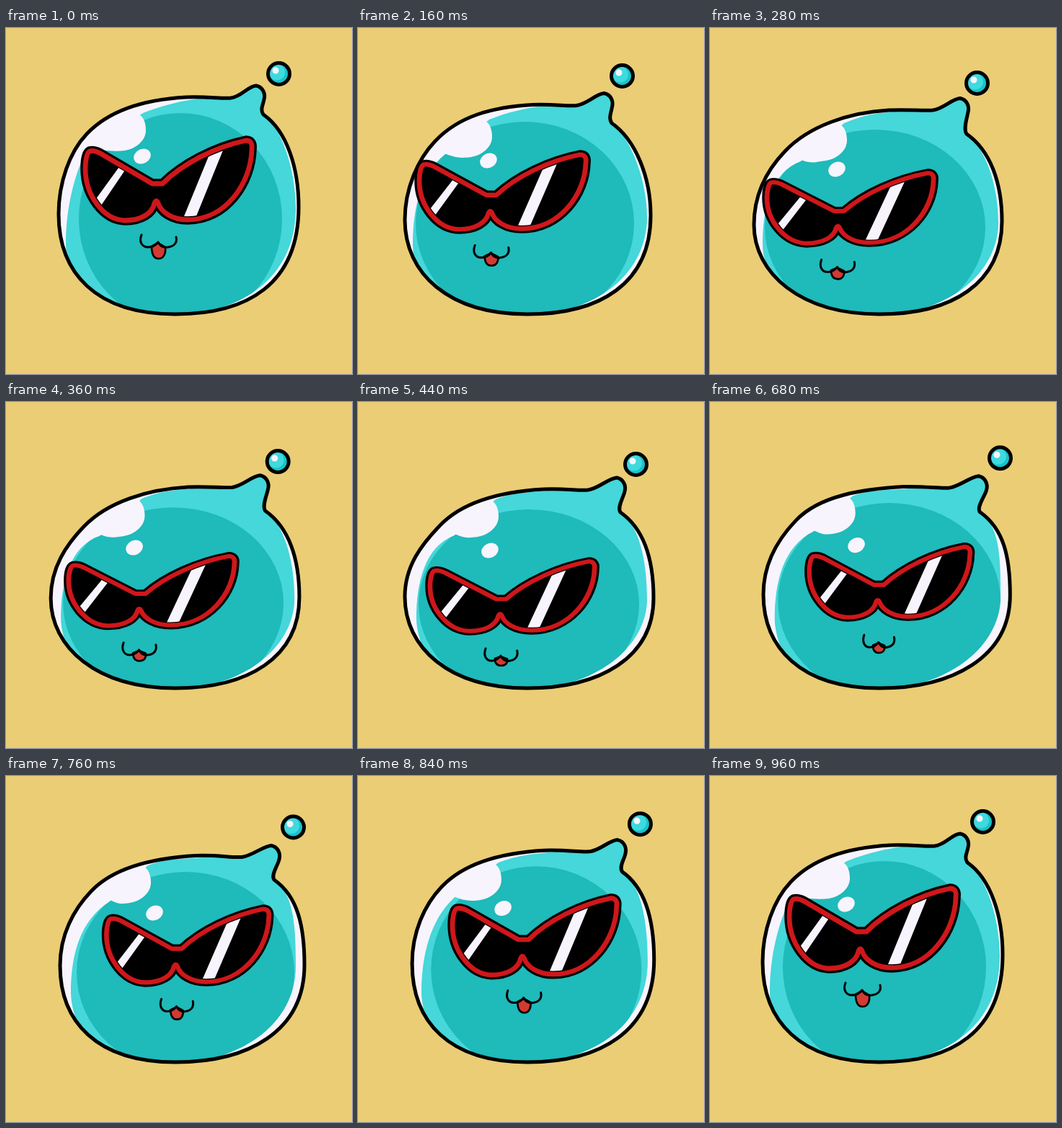
Recreate the animation shown at these times as an HTML page. Size 480 px wide and 480 px high, loop 1000 ms.

```html
<!DOCTYPE html>
<html lang="en">
<head>
<meta charset="utf-8">
<title>Slime in sunglasses</title>
<style>
  html, body { margin: 0; width: 100%; height: 100%; overflow: hidden; background: #eacd75; }
  svg { display: block; width: 100%; height: 100%; }
  .line { fill: none; stroke: #000; stroke-linecap: round; stroke-linejoin: round; }
  .line, #tongue, #glasses path { vector-effect: non-scaling-stroke; }
</style>
</head>
<body>
<!-- In data-d a letter after a point names the track that moves it. -->
<svg viewBox="0 0 480 480">
  <defs>
    <path id="body" data-d="M73,258l C73,215l 88,172a 112,147a C145,112a 195,99t 250,96t
      C280,95t 298,98n 312,97n C327,95n 335,81p 347,80p C357,82p 360,92p 358,99p
      C357,106p 352,113k 357,120k C390,143k 406,195r 406,248r
      C406,355s 335,397 235,397 C125,397 73,340b 73,258l Z"/>
    <path id="light" data-d="M83,300m C83,250m 95,200m 114,166h L190,118g C215,108g 245,100u 275,97u
      L275,80u L345,60p L385,90p L364,126k C385,148k 402,200e 402,250e
      C402,322z 360,378 268,396 L235,420 L130,400 C100,365m 83,330m 83,300m Z"/>
    <path id="frame" d="M116,171 C122,169 127,172 131,174 L203,216 H217 C245,188 290,165 333,156
      C340,156 342,161 341,168 C340,215 305,266 252,266 C230,266 215,255 211,243 Q208.5,237 206,243
      C203,257 188,267 165,267 C135,266 110,232 110,195 C110,185 112,173 116,171 Z"/>
    <clipPath id="inBody"><use href="#body"/></clipPath>
    <clipPath id="inLight"><use href="#light"/></clipPath>
    <clipPath id="inFrame"><use href="#frame"/></clipPath>
  </defs>

  <g clip-path="url(#inBody)">
    <use href="#body" fill="#f8f4fd"/>
    <use href="#light" fill="#45d7d9"/>
    <g clip-path="url(#inLight)"><ellipse id="shade" fill="#1fbaba"/></g>
    <path fill="#f8f4fd" data-d="M112,147a L112,163h C128,170h 150,172g 165,170g
      C182,167g 194,155g 194,142g C194,132g 191,124g 185,120g L180,95g Z"/>
  </g>
  <use href="#body" class="line" stroke-width="5"/>

  <g id="spot"><ellipse rx="12.2" ry="10" fill="#f8f4fd" transform="translate(189 178) rotate(-28)"/></g>

  <g id="drop">
    <circle cx="378.5" cy="63.5" r="15" fill="#17c3ca"/>
    <circle cx="376" cy="61.5" r="11" fill="#3fdade"/>
    <circle cx="374" cy="59" r="4.5" fill="#f8f4fd"/>
    <circle cx="378.5" cy="63.5" r="15" class="line" stroke-width="5"/>
  </g>

  <g id="mouth">
    <path id="tongue" d="M202,303 C202,312 204,320 212,320 C219,320 222,312 221,304 L211,298 Z"
      fill="#d23a33" stroke="#000" stroke-width="2.6" stroke-linejoin="round"/>
    <path class="line" stroke-width="3" d="M188,287 C184,297 189,304 197,304 C204,304 208,301 211,297
      C214,303 219,305 225,304 C233,303 238,298 236,290"/>
  </g>

  <g id="glasses">
    <path class="line" stroke-width="14" d="M0,0"/>
    <use href="#frame" fill="#000" stroke="#000" stroke-width="13.5" stroke-linejoin="round"/>
    <g clip-path="url(#inFrame)" fill="#f8f4fd">
      <path d="M159,190 H170 L128,252 H114 Z M286,166 H302.5 L262,266 H245 Z"/>
    </g>
    <use href="#frame" fill="none" stroke="#000" stroke-width="9.5" stroke-linejoin="round"/>
    <use href="#frame" fill="none" stroke="#cf171b" stroke-width="6.8" stroke-linejoin="round"/>
  </g>
</svg>

<script>
  const STEP = 40, STEPS = 25, CYCLE = 24;
  const KEYS = [0, 4, 7, 11, 15, 19];
  const STILL = [0, 0, 0, 0, 0, 0];

  // Offsets from the first pose: [x at each key, y at each key]
  const tracks = {
    l: [[0, -8, -12, -8, -1, 2], [0, 8, 15, 12, 12, 5]],
    a: [[0, -5, -8, 1, 7, 6], [0, 10, 24, 25, 21, 13]],
    t: [[0, -8, -2, 8, 20, 14], [0, 10.5, 18, 25, 27, 14.5]],
    n: [[0, -9, -3, 7, 21, 15], [0, 10.5, 17, 25, 27, 15.5]],
    p: [[0, -5.5, 0, 12, 26.5, 21], [0, 10.5, 17.5, 25, 27, 16.5]],
    k: [[0, -5, -1, 7, 17, 15], [0, 12, 27, 33, 38, 24]],
    r: [[0, 0, -1, 4, 11, 8], [0, 12, 20, 24, 24, 14]],
    m: [[0, -7, -10, -2, 5, 7], STILL],
    h: [[0, 6, 12, 20, 25, 30], [0, 10, 19, 19, 19, 8]],
    g: [[0, -8, -4, 1, 7, 7], [0, 9, 14, 17, 18, 6]],
    u: [[0, -10, -22, -12, 6, -4], [0, 10, 19, 26, 28, 16]],
    e: [[0, -1, -2, -1, 2, 0], [0, 12, 20, 24, 24, 14]],
    drop: [[0, -12, -8, 7, 24, 20], [0, 3, 13, 23, 20.5, 7.5]],
    spot: [[0, -8, -13, -6, 8, 17], [0, 6, 18, 28, 28, 12]],
    mouth: [[0, -26.5, -34.5, -13, 14.5, 25.5], [0, 14.5, 34.5, 55, 48.5, 22.5]]
  };
  // Sideways-only versions
  tracks.s = [tracks.r[0], STILL];
  tracks.b = [tracks.l[0], STILL];
  tracks.z = [tracks.e[0], STILL];

  const shade = {
    left: [101, 80, 76, 84, 90, 98],
    right: [383, 383, 382, 390, 403, 400],
    top: [118, 130, 141, 149, 146, 133]
  };
  const specs = {
    left: [104, 79, 73, 94, 124, 133.5],
    top: [150, 170, 196, 216, 210, 179],
    width: [242, 242, 242, 239, 232.5, 236],
    height: [123, 115, 108, 107, 105, 113]
  };
  const grin = [1, .97, .95, .91, .84, .91];
  const lick = [1, .78, .72, .58, .5, .78];

  const count = KEYS.length;
  const wrap = i => (i + count) % count;
  const keyTime = i => KEYS[wrap(i)] + CYCLE * Math.floor(i / count);

  // Smooth cyclic curve through the key values
  function curve(v, f) {
    const i = KEYS.findLastIndex(k => k <= f);
    const val = j => v[wrap(j)];
    const rate = j => (val(j + 1) - val(j)) / (keyTime(j + 1) - keyTime(j));
    const slope = j => {
      const before = keyTime(j) - keyTime(j - 1), after = keyTime(j + 1) - keyTime(j);
      return (rate(j - 1) * after + rate(j) * before) / (before + after);
    };
    const span = keyTime(i + 1) - keyTime(i);
    const u = (f - keyTime(i)) / span, w = 1 - u;
    return val(i) * w * w * (1 + 2 * u) + val(i + 1) * u * u * (3 - 2 * u)
      + span * u * w * (slope(i) * w - slope(i + 1) * u);
  }

  const $ = id => document.getElementById(id);
  const shapes = [...document.querySelectorAll('[data-d]')];

  function set(el, attrs) {
    for (const name in attrs) el.setAttribute(name, attrs[name]);
  }

  function sample(group, f) {
    return Object.fromEntries(Object.entries(group).map(([k, v]) => [k, curve(v, f)]));
  }

  function draw(f) {
    const off = {};
    for (const k in tracks) off[k] = tracks[k].map(v => curve(v, f));

    for (const el of shapes) {
      el.setAttribute('d', el.dataset.d.replace(/([\d.]+),([\d.]+)([a-z]?)/g, (_, x, y, k) => {
        const [dx, dy] = off[k] || [0, 0];
        return (+x + dx).toFixed(2) + ',' + (+y + dy).toFixed(2);
      }));
    }

    const s = sample(shade, f), floor = 412;
    set($('shade'), {
      cx: (s.left + s.right) / 2, rx: (s.right - s.left) / 2,
      cy: (s.top + floor) / 2, ry: (floor - s.top) / 2
    });

    for (const id of ['drop', 'spot']) set($(id), { transform: `translate(${off[id]})` });

    const [mx, my] = off.mouth;
    set($('mouth'), { transform: `translate(${211 + mx} ${298 + my}) scale(${curve(grin, f)} 1) translate(-211 -298)` });
    set($('tongue'), { transform: `translate(0 298) scale(1 ${curve(lick, f)}) translate(0 -298)` });

    const g = sample(specs, f);
    set($('glasses'), {
      transform: `translate(${g.left} ${g.top}) scale(${g.width / 242} ${g.height / 123}) translate(-104 -150)`
    });
  }

  function tick() {
    const step = Math.floor((performance.now() + .5) / STEP) % STEPS;
    draw(step % CYCLE);
    requestAnimationFrame(tick);
  }
  draw(0);
  requestAnimationFrame(tick);
</script>
</body>
</html>
```
